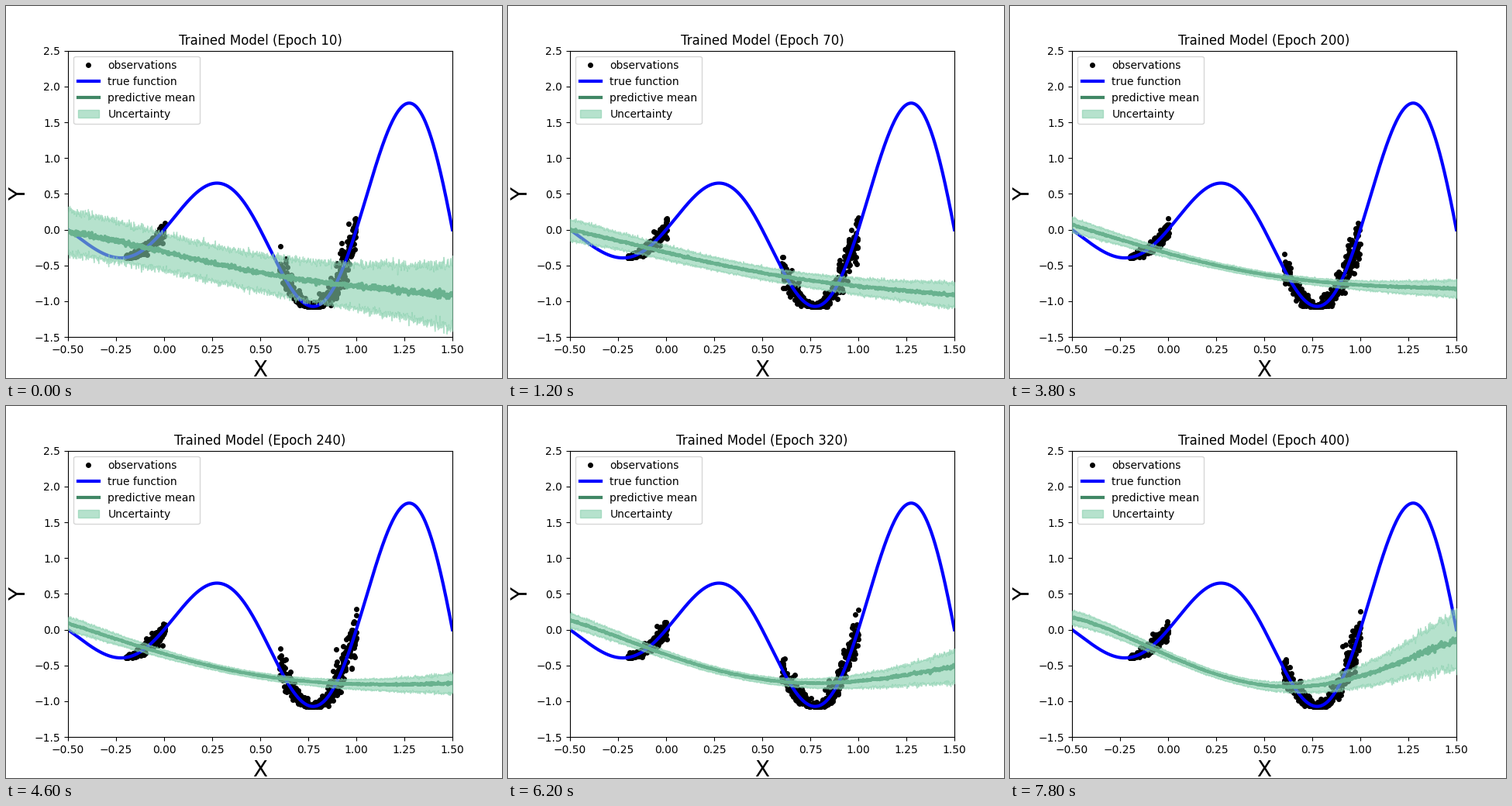
A matplotlib script that plays this animation: 640 by 480 pixels, repeating every 8 s.

```python
import numpy as np
import matplotlib.pyplot as plt
from matplotlib.animation import FuncAnimation

FRAMES, STEP_MS = 40, 200
LAST_EPOCH = 10 * FRAMES
MEAN_COLOR, BAND_COLOR = "#408765", "#86cfac"
SAMPLES = 70         # Monte Carlo draws behind each prediction
INPUT_NOISE = 0.02

x = np.linspace(-0.5, 1.5, 1000)


def through(*ys):
    """Quartic through values at evenly spaced x over the plotted range."""
    knots = np.linspace(x[0], x[-1], len(ys))
    return np.polyval(np.polyfit(knots, ys, len(ys) - 1), x)


# The mean starts nearly straight, tilts steadily and bends late in training
START = through(-0.04, -0.31, -0.60, -0.79, -0.92)
TILT = through(0.22, -0.04, -0.01, 0, 0)
BEND = through(-0.01, -0.01, -0.165, 0.14, 0.78)


def true_function(t):
    return 0.5 * np.exp(t) * np.sin(2 * np.pi * t)


def mean_curve(epoch):
    u = epoch / LAST_EPOCH
    return START + TILT * u + BEND * u ** 3


def half_width(epoch):
    """Early uncertainty dies away, extrapolation on the right grows late."""
    floor = 0.04 + 0.06 * (x - 0.5) ** 2
    early = (0.20 + 0.06 * x ** 2) * np.exp((10 - epoch) / 40)
    late = 0.30 * (epoch / LAST_EPOCH * (x + 0.5) / 2) ** 4
    return floor + early + late


def observe(rng):
    xs = np.concatenate([rng.uniform(-0.2, 0.005, 200),
                         rng.uniform(0.6, 1, 400)])
    return xs, true_function(xs + rng.normal(0, INPUT_NOISE, xs.size))


def predict(epoch, rng):
    """Sampled mean and two-sigma bounds, jittered by the finite draw count."""
    std = half_width(epoch) / 2
    mean = mean_curve(epoch)
    mean = mean + std * rng.normal(0, 1 / np.sqrt(SAMPLES), x.size)
    std = std * (1 + rng.normal(0, 1 / np.sqrt(2 * SAMPLES), x.size))
    return mean, mean - 2 * std, mean + 2 * std


def draw_band(low, high):
    return ax.fill_between(x, low, high, color=BAND_COLOR, alpha=0.6,
                           zorder=3, label="Uncertainty")


fig, ax = plt.subplots(figsize=(6.4, 4.8), dpi=100)
dots, = ax.plot([], [], "ko", markersize=4, label="observations")
ax.plot(x, true_function(x), "b-", linewidth=3, label="true function")
mean_line, = ax.plot([], [], color=MEAN_COLOR, linewidth=3,
                     label="predictive mean")
band = draw_band(x, x)
ax.set_xlim(-0.5, 1.5)
ax.set_ylim(-1.5, 2.5)
ax.set_xlabel("X", fontsize=20)
ax.set_ylabel("Y", fontsize=20)
ax.legend(loc="upper left")


def update(frame):
    global band
    epoch = 10 * (frame + 1)
    rng = np.random.default_rng(epoch)
    dots.set_data(*observe(rng))
    mean, low, high = predict(epoch, rng)
    mean_line.set_data(x, mean)
    band.remove()
    band = draw_band(low, high)
    ax.set_title(f"Trained Model (Epoch {epoch})", pad=5.3)
    return dots, mean_line, band


anim = FuncAnimation(fig, update, frames=FRAMES, interval=STEP_MS,
                     init_func=lambda: update(0), repeat=True, repeat_delay=0)
plt.show()
```
